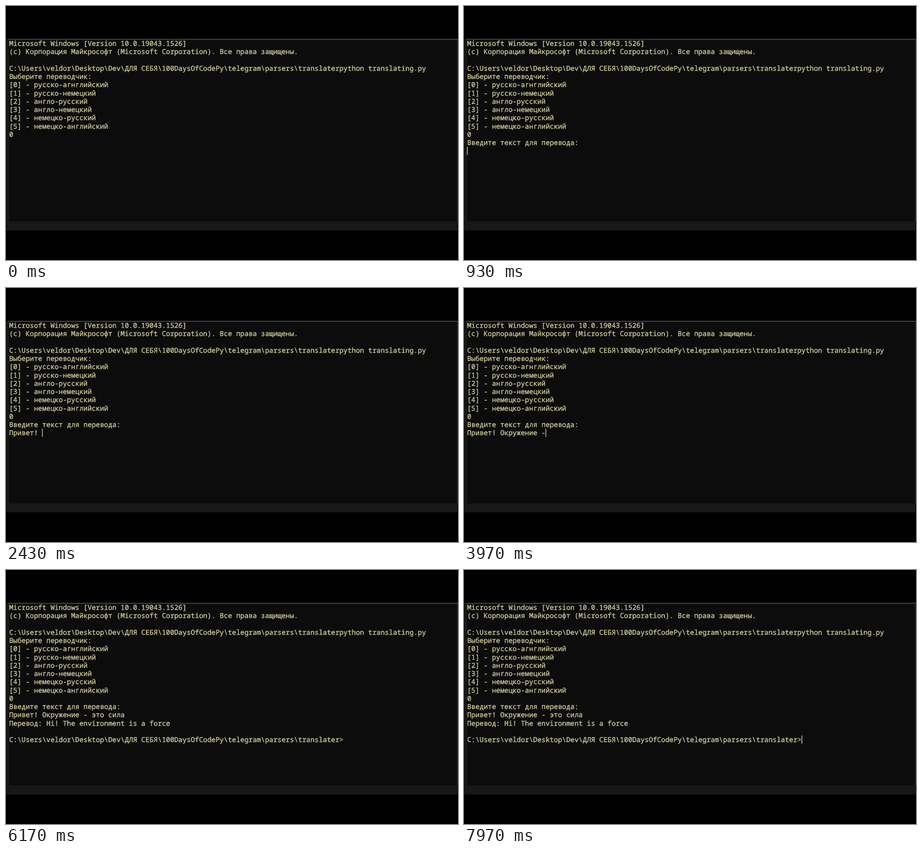
An HTML page for the animation above (8 s loop, 998 by 561 pixels).

```html
<!DOCTYPE html>
<html lang="ru">
<head>
<meta charset="utf-8">
<title>Console translator</title>
<style>
  html, body { margin: 0; width: 100%; height: 100%; overflow: hidden; background: #000; }
  svg { display: block; width: 100%; height: 100%; }
  text {
    font: 15.2px "Noto Sans Mono", "DejaVu Sans Mono", monospace;
    fill: #c8c498;
    stroke: #c8c498;
    stroke-width: 0.45px;
    white-space: pre;
    text-rendering: geometricPrecision;
  }
</style>
</head>
<body>
<svg viewBox="0 0 998 561">
  <rect width="998" height="561" fill="#000"/>
  <rect x="1" y="73" width="996" height="422.5" fill="#181819"/>
  <rect x="7" y="75" width="990" height="401" fill="#0c0c0d"/>
  <rect x="4" y="72.5" width="994" height="2" fill="#45454d"/>
  <rect x="996" y="74" width="1.5" height="402" fill="#303034"/>
  <g id="lines"></g>
  <rect id="caret" width="1.6" height="18" fill="#c2c2b4"/>
</svg>
<script>
const LOOP = 8000, LEFT = 7, TOP = 88.1, PITCH = 9.12, ROW = 18.25;
const PROMPT_AT = 450, ENTER_AT = 4850, RESULT_AT = 5600, BLINK = 530;
const INPUT_ROW = 13, END_ROW = 16;

const path = 'C:\\Users\\veldor\\Desktop\\Dev\\ДЛЯ СЕБЯ\\100DaysOfCodePy\\telegram\\parsers\\translater';
const phrase = 'Привет! Окружение - это сила';
const intro = [
  'Microsoft Windows [Version 10.0.19043.1526]',
  '(c) Корпорация Майкрософт (Microsoft Corporation). Все права защищены.',
  '',
  path + 'python translating.py',
  'Выберите переводчик:',
  '[0] - русско-агнглийский',
  '[1] - русско-немецкий',
  '[2] - англо-русский',
  '[3] - англо-немецкий',
  '[4] - немецко-русский',
  '[5] - немецко-английский',
  '0'
];
const result = ['Перевод: Hi! The environment is a force', '', path + '>'];

const group = document.getElementById('lines');
const caret = document.getElementById('caret');
const rows = Array.from({ length: END_ROW + 1 }, (_, i) => {
  const el = document.createElementNS('http://www.w3.org/2000/svg', 'text');
  el.setAttribute('x', LEFT);
  el.setAttribute('y', TOP + i * ROW);
  return group.appendChild(el);
});

// Moment the k-th character is typed; the last words go faster.
const keyTime = k => k < 20 ? 1310 + 135 * k : 4010 + 95 * (k - 20);

function typedCount(t) {
  let n = 0;
  while (n < phrase.length && keyTime(n + 1) <= t) n++;
  return n;
}

function setCaret(on, row, col) {
  caret.setAttribute('visibility', on ? 'visible' : 'hidden');
  caret.setAttribute('x', LEFT + col * PITCH - 0.4);
  caret.setAttribute('y', TOP + row * ROW - 14.5);
}

function render(t) {
  const typed = typedCount(t);
  const text = [...intro];
  if (t >= PROMPT_AT) text.push('Введите текст для перевода:', phrase.slice(0, typed));
  if (t >= RESULT_AT) text.push(...result);
  rows.forEach((el, i) => {
    const line = text[i] || '';
    if (el.textContent !== line) el.textContent = line;
  });

  if (t >= RESULT_AT) {
    setCaret(Math.floor((t - RESULT_AT) / BLINK) % 2 === 0, END_ROW, path.length + 1);
  } else {
    const since = t - (typed ? keyTime(typed) : PROMPT_AT);
    setCaret(since >= 0 && since < BLINK && t < ENTER_AT, INPUT_ROW, typed);
  }
}

const start = performance.now();
function tick() {
  render((performance.now() - start) % LOOP);
  requestAnimationFrame(tick);
}
tick();
</script>
</body>
</html>
```
